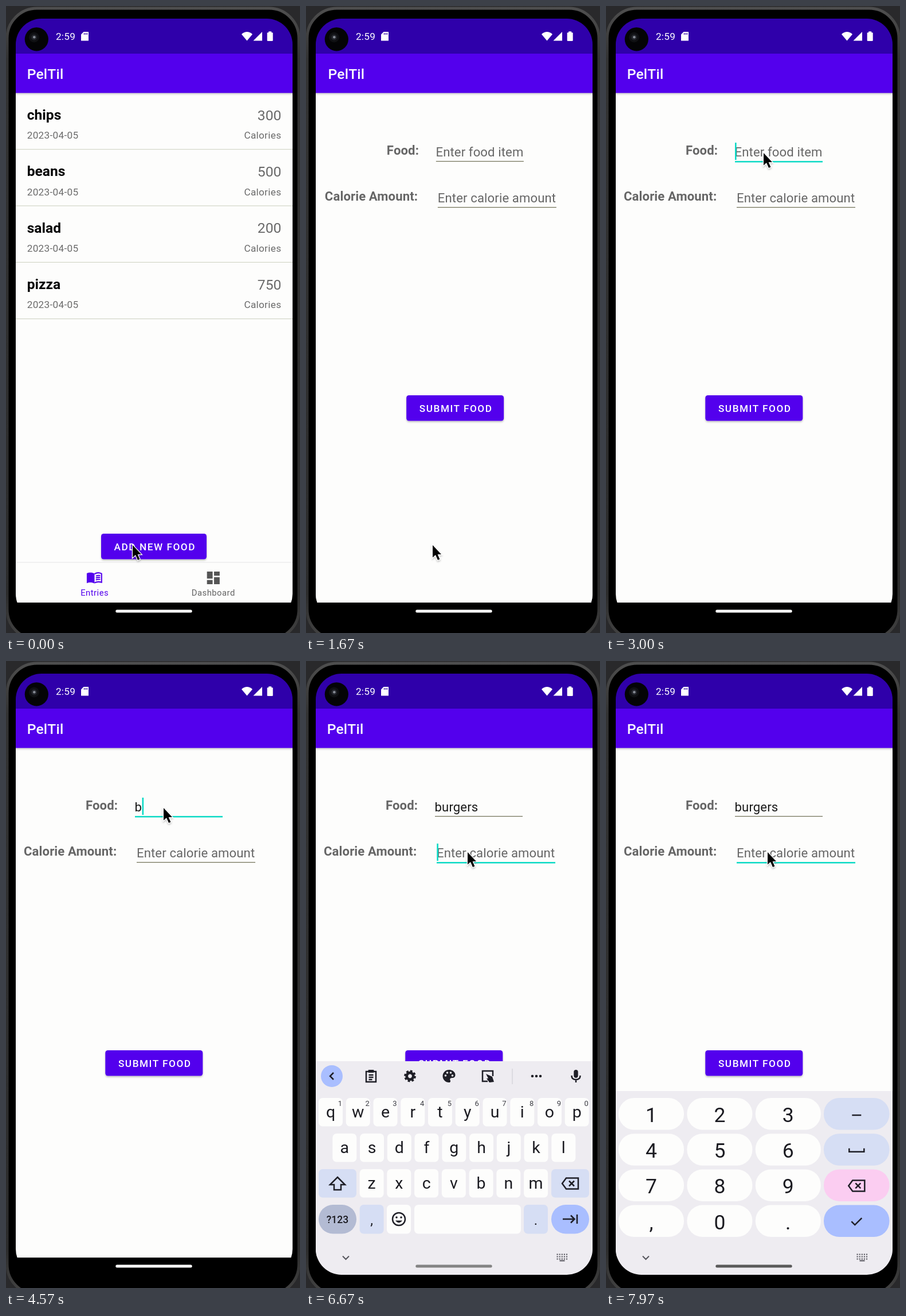
Write an HTML page that moves like this. It is 513 px wide and 1092 px high and loops after 8 s.

```html
<!DOCTYPE html>
<html lang="en">
<head>
<meta charset="utf-8">
<title>Food log</title>
<style>
html, body { margin: 0; width: 100%; height: 100%; overflow: hidden; background: #29292b; }
svg { display: block; width: 100vw; height: 100vh; }
text { font-family: Roboto, "Noto Sans", sans-serif; white-space: pre; }
.title { font-size: 24.6px; font-weight: 500; letter-spacing: .2px; fill: #fff; }
.food { font-size: 24.6px; font-weight: 700; fill: #050505; }
.amount { font-size: 24.6px; fill: #696969; text-anchor: end; }
.small { font-size: 17.2px; letter-spacing: .3px; fill: #6b6b6b; }
.end { text-anchor: end; }
.button { font-size: 17.2px; font-weight: 500; letter-spacing: 1.54px; fill: #fff; text-anchor: middle; }
.tab { font-size: 14.8px; letter-spacing: .49px; text-anchor: middle; }
.field { font-size: 22.1px; letter-spacing: .12px; fill: #666; }
.label { font-weight: 700; }
.typed { fill: #1b1b1b; }
.key { font-size: 28.5px; fill: #1b1b21; text-anchor: middle; }
.hint { font-size: 13px; fill: #3c3c44; text-anchor: middle; }
.digit { font-size: 35.5px; fill: #1b1b21; text-anchor: middle; }
.line { fill: none; stroke: #1f1f27; stroke-width: 2.5; }
</style>
</head>
<body>
<svg viewBox="0 0 513 1092" preserveAspectRatio="none">
  <defs>
    <clipPath id="screen"><rect x="17" y="22" width="483" height="1047" rx="45"/></clipPath>
    <clipPath id="window"><rect x="17" y="83" width="483" height="956"/></clipPath>
    <linearGradient id="rim" x2="0" y2="1">
      <stop offset="0" stop-color="#4e4e4e"/><stop offset=".08" stop-color="#333"/>
      <stop offset=".93" stop-color="#2c2c2c"/><stop offset="1" stop-color="#444"/>
    </linearGradient>
    <linearGradient id="fade" x2="0" y2="1">
      <stop offset="0" stop-color="#000" stop-opacity=".2"/><stop offset="1" stop-color="#000" stop-opacity="0"/>
    </linearGradient>
    <filter id="shadow" x="-30%" y="-30%" width="170%" height="180%">
      <feDropShadow dx="0" dy="2" stdDeviation="1.5" flood-opacity=".25"/>
    </filter>
  </defs>
  <rect width="513" height="1092" fill="#29292b"/>
  <rect x="2" y="4" width="509" height="1099" rx="52" fill="#000" stroke="url(#rim)" stroke-width="5"/>
  <g clip-path="url(#screen)">
    <rect x="17" y="22" width="483" height="62" fill="#2f00aa"/>
    <g clip-path="url(#window)">
      <g id="entries"></g>
      <g id="form"></g>
    </g>
    <g id="keyboard"></g>
  </g>
  <g id="status"></g>
  <rect id="pill" x="191.3" y="1051.6" width="133.4" height="5" rx="2.5"/>
  <g id="pointer">
    <path d="M1 2V23.5L6 19L10 28L13.4 26.5L9.6 18H16Z" fill="#000" stroke="#fff" stroke-width="2.4" paint-order="stroke" filter="url(#shadow)"/>
  </g>
</svg>
<script>
const LOOP = 8000;
const PURPLE = '#5300ed', TEAL = '#0bdac5', INK = '#1f1f27';
const WHITE = '#fdfdfc', PALE = '#d6def4', BLUE = '#a9beff', BOARD = '#eeecf1';
const byId = id => document.getElementById(id);

const rect = (x, y, w, h, fill, r = 0, extra = '') =>
  `<rect x="${x}" y="${y}" width="${w}" height="${h}" rx="${r}" fill="${fill}" ${extra}/>`;
const text = (x, y, value, cls, extra = '') => `<text x="${x}" y="${y}" class="${cls}" ${extra}>${value}</text>`;
const path = (d, extra = 'class="line"') => `<path d="${d}" ${extra}/>`;
const circle = (x, y, r, extra) => `<circle cx="${x}" cy="${y}" r="${r}" ${extra}/>`;
const at = (x, y, body, scale = 1) => `<g transform="translate(${x} ${y}) scale(${scale})">${body}</g>`;
const fill = color => `fill="${color}"`;

// Page edges extend sideways so that a sliding page leaves no gap.
const appPage = () =>
  rect(-40, 83, 600, 956, WHITE) + rect(-40, 151, 600, 5, 'url(#fade)') +
  rect(-40, 83, 600, 68.5, PURPLE) + text(36.7, 127, 'PelTil', 'title');
const button = (x, y, w, label) =>
  rect(x, y, w, 44.5, PURPLE, 4.5, 'filter="url(#shadow)"') + text(259.8, y + 29, label, 'button');

function buildEntries() {
  const foods = [['chips', 300], ['beans', 500], ['salad', 200], ['pizza', 750]];
  const rows = foods.map(([name, calories], i) => at(0, i * 98.4,
    text(36.7, 198, name, 'food') + text(480.3, 198.5, calories, 'amount') +
    text(36.7, 231.3, '2023-04-05', 'small') + text(480.3, 231.3, 'Calories', 'small end') +
    rect(17, 249, 483, 1.2, '#d3d6c8'))).join('');
  const book = path('M1 5.5C4 4 9 4 12 6V20C9 18.2 4 18.2 1 19.5Z', fill(PURPLE)) +
    path('M12 6.5C15 4.5 19 4.5 22 6V18.3C19 17.4 15 17.4 12 19M14 9.5Q17 8.2 20 8.8M14 12.2Q17 10.9 20 11.5M14 14.9Q17 13.6 20 14.2',
      `fill="none" stroke="${PURPLE}" stroke-width="1.7"`);
  const tiles = path('M3 13h8V3H3zM3 21h8v-6H3zM13 21h8V11h-8zM13 3v6h8V3z', fill('#555'));
  byId('entries').innerHTML = appPage() + rows + button(166, 919, 184, 'ADD NEW FOOD') +
    rect(17, 968.5, 483, 1, '#e5e5e8') + at(139.7, 981.2, book, 1.23) + at(347, 981.2, tiles, 1.23) +
    text(154.7, 1027, 'Entries', 'tab', fill(PURPLE)) + text(361.8, 1027, 'Dashboard', 'tab', fill('#646464'));
}

function buildForm() {
  byId('form').innerHTML = appPage() +
    text(139, 259, 'Food:', 'field label') + text(31, 338.5, 'Calorie Amount:', 'field label') +
    text(224.6, 261.5, '', 'field', 'id="food"') + text(228, 341.5, 'Enter calorie amount', 'field') +
    '<rect id="foodLine" x="225" width="153"/><rect id="calorieLine" x="228" width="207"/>' +
    rect(225, 263.6, 0, 1.4, '#1b1b1b', 0, 'id="composing"') +
    rect(0, 0, 2.6, 30, TEAL, 0, 'id="caret"') + button(173.3, 678, 170, 'SUBMIT FOOD');
}

const mic = rect(-3.7, -11, 7.4, 14, INK, 3.7) + path('M-7.5 -1Q-7.5 6 0 6Q7.5 6 7.5 -1M0 6V11');
const backspace = path('M-7 -9.5H14V9.5H-7L-14 0ZM-2 -4.5L7 4.5M7 -4.5L-2 4.5');
const arrowCircle = side => circle(45, 723, 19, fill(BLUE)) + at(45, 723, path(`M${-3 * side} -6L${3 * side} 0L${-3 * side} 6`));

function toolbar() {
  const clipboard = path('M-8.5 -8H8.5V10H-8.5ZM-4 -2H4M-4 2H4M-4 6H2') + rect(-5, -11, 10, 5, INK, 1);
  const gear = circle(0, 0, 5.8, 'class="line" style="stroke-width:4.8"') +
    circle(0, 0, 8.7, 'class="line" style="stroke-width:3.4" stroke-dasharray="3.8 3.033"');
  const holes = [[-6, -1], [-3, -6], [3, -6], [6, -1]].map(([x, y]) => circle(x, y, 1.8, fill(BOARD))).join('');
  const palette = path('M0 -11A11 11 0 0 0 0 11C3 11 3 8 2 7C1 4 3 3 6 3C9 3 11 1 11 -2C11 -7 6 -11 0 -11Z', fill(INK)) + holes;
  const resize = path('M9 0V-9H-9V9H0') + path('M-3 -4L8 1L11 10L3 11L-2 4L1 4Z', fill(INK));
  const dots = [-7, 0, 7].map(x => circle(x, 0, 2.3, fill(INK))).join('');
  return arrowCircle(-1) + at(113.5, 723, clipboard) + at(181.5, 723, gear) + at(249.5, 723, palette) +
    at(317, 723, resize) + rect(359.5, 710, 1, 27, '#c9c9d2') + at(402, 723, dots);
}

function letterKeys() {
  const rows = [['qwertyuiop', 22, 761], ['asdfghjkl', 46.3, 823], ['zxcvbnm', 93.6, 885]];
  const keys = rows.map(([letters, left, y], row) => [...letters].map((letter, i) => {
    const x = left + i * 47.75;
    return rect(x, y, 42, 49.5, WHITE, 7) + text(x + 21, y + 33.5, letter, 'key') +
      (row ? '' : text(x + 37.5, y + 13.5, (i + 1) % 10, 'hint'));
  }).join('')).join('');
  const shift = path('M0 -11L13 2H6V11H-6V2H-13Z');
  const smile = circle(0, 0, 11, 'class="line"') + circle(-4, -3, 1.8, fill(INK)) + circle(4, -3, 1.8, fill(INK)) +
    path('M-6 2.5Q0 10 6 2.5Z', fill(INK));
  const next = path('M-13 0H7M1 -6.5L7.5 0L1 6.5M12 -8V8');
  return keys + rect(22, 885, 66, 49.5, PALE, 7) + at(55, 910, shift) +
    rect(428, 885, 66, 49.5, PALE, 7) + at(461, 910, backspace) +
    rect(22, 947, 66, 50.5, '#b3bbd3', 25) + text(55, 979, '?123', 'key', 'style="font-size:17.5px;font-weight:500"') +
    rect(93.6, 947, 42, 50.5, PALE, 7) + text(114.6, 982, ',', 'key', 'style="font-size:24px"') +
    rect(141, 947, 42, 50.5, WHITE, 7) + at(162, 972, smile) + rect(189, 947, 186, 50.5, WHITE, 7) +
    rect(380, 947, 42, 50.5, PALE, 7) + text(401, 982, '.', 'key', 'style="font-size:24px"') +
    rect(428, 947, 66, 50.5, BLUE, 25) + at(461, 972, next);
}

function numberKeys() {
  const sideColors = [PALE, PALE, '#fbcdf1', BLUE];
  const icons = ['M-8 1.5H8', 'M-13 -3V3H13V-3', '', 'M-9 0L-3 6L9 -6'];
  return ['123', '456', '789', ',0.'].map((digits, row) => {
    const y = 761 + row * 62.2;
    return [...digits].map((digit, i) => rect(22 + i * 119.4, y, 114, 55.5, WHITE, 27) +
        text(79 + i * 119.4, y + 42, digit, 'digit')).join('') +
      rect(380, y, 114.5, 55.5, sideColors[row], 27) +
      at(437.3, y + 28.5, row === 2 ? backspace : path(icons[row]));
  }).join('');
}

function buildKeyboard() {
  const dots = [0, 1, 2].map(r => path(`M-9 ${r * 4 - 5}H10`, 'stroke="#55555c" stroke-width="2.2" stroke-dasharray="2.2 1.9"')).join('');
  byId('keyboard').innerHTML =
    rect(17, 697, 483, 400, BOARD, 0, 'id="board"') +
    `<g id="letters"><g id="tools">${toolbar()}</g>` +
    `<g id="collapsed">${arrowCircle(1)}${rect(436.5, 699, 1, 48, '#cfcfd8')}</g>` +
    `${at(471, 723, mic)}${letterKeys()}</g><g id="numbers">${numberKeys()}</g>` +
    at(69.5, 1039.5, path('M-5.5 -3L0 2.5L5.5 -3', 'fill="none" stroke="#55555c" stroke-width="2"')) +
    at(446.5, 1038.5, dots + path('M-4 6H5', 'stroke="#55555c" stroke-width="2"'));
}

function buildStatus() {
  byId('status').innerHTML = circle(53.3, 57.8, 20.6, fill('#040406')) + circle(49, 54.5, 9, fill('#0f1013')) +
    circle(49, 54.5, 5, fill('#23252b')) + circle(49.3, 54.2, 2.3, fill('#858a94')) +
    text(86.9, 59.3, '2:59', 'small', 'style="fill:#fff"') +
    path('M135.5 45H144V60.5H131V49.5Z', fill('#fff')) +
    path('M136.5 47V50M139 47V50M141.5 47V50', 'stroke="#2f00aa" stroke-width="1.2"') +
    path('M420.5 60.5L411 49.2Q420.5 41 430 49.2Z', fill('#fff')) + path('M447 45V60.5H431.5Z', fill('#fff')) +
    rect(455.7, 46.3, 10, 14.7, '#fff', 1.2) + rect(458.2, 44.3, 5, 3, '#fff');
}

const clamp = v => Math.max(0, Math.min(1, v));
const progress = (t, from, to) => clamp((t - from) / (to - from));
const smooth = p => p * p * (3 - 2 * p);
const easeOut = p => 1 - (1 - p) ** 3;
const pageEase = p => p < 1 / 6 ? .4 * (6 * p) ** 3 : 1 - .6 * (1 - (p - 1 / 6) * 1.2) ** 4;
const show = (id, on) => byId(id).style.display = on ? '' : 'none';
const set = (id, values) => Object.entries(values).forEach(([name, value]) => byId(id).setAttribute(name, value));

const OPEN = 1410, FOCUS_FOOD = 2750, FOCUS_CALORIES = 6400, KEYBOARD_IN = 4740, NUMBERS = 6800;
const WORD = 'burgers', KEY_TIMES = [4400, 5150, 5450, 5720, 5860, 6000, 6150];
const MOVES = [[1950, 2650, 220, 937, 274, 254], [5300, 5700, 274, 254, 281, 331]];

const drawField = (id, y, focused) =>
  set(id, { y, height: focused ? 2.5 : 1.3, fill: focused ? TEAL : '#77775f' });

function draw(t) {
  const slide = pageEase(progress(t, OPEN, OPEN + 450));
  set('entries', { transform: `translate(${-48.3 * slide} 0)` });
  set('form', { transform: `translate(${48.3 * (1 - slide)} 0)`, opacity: progress(t, OPEN + 50, OPEN + 133) });
  show('entries', t < OPEN + 450);

  const typed = KEY_TIMES.filter(time => time <= t).length;
  const onCalories = t >= FOCUS_CALORIES;
  const onFood = t >= FOCUS_FOOD && !onCalories;
  const food = byId('food');
  food.textContent = typed ? WORD.slice(0, typed) : 'Enter food item';
  food.setAttribute('class', typed ? 'field typed' : 'field');
  const width = typed ? food.getComputedTextLength() : 0;
  drawField('foodLine', 269.9, onFood);
  drawField('calorieLine', 350, onCalories);

  const composing = onFood && typed > 1;
  set('composing', { width: composing ? width : 0 });
  const lastInput = onCalories ? FOCUS_CALORIES : typed ? KEY_TIMES[typed - 1] : FOCUS_FOOD;
  show('caret', (onFood || onCalories) && (t - lastInput) % 1000 < 500);
  set('caret', onCalories ? { x: 228.3, y: 318 } : { x: 225 + width, y: 238 });

  const numeric = t >= NUMBERS;
  show('keyboard', t >= KEYBOARD_IN);
  set('keyboard', { transform: `translate(0 ${372 * (1 - easeOut(progress(t, KEYBOARD_IN, KEYBOARD_IN + 290)))})` });
  set('board', { y: numeric ? 749 : 697 });
  show('letters', !numeric);
  show('numbers', numeric);
  show('tools', !composing);
  show('collapsed', composing);

  const shade = Math.round(253 - 163 * progress(t, 6500, 6730));
  set('pill', { fill: `rgb(${shade},${shade},${shade})` });

  const [from, to, x0, y0, x1, y1] = t < 4000 ? MOVES[0] : MOVES[1];
  const p = smooth(progress(t, from, to));
  set('pointer', { transform: `translate(${x0 + (x1 - x0) * p} ${y0 + (y1 - y0) * p})` });
}

buildEntries();
buildForm();
buildKeyboard();
buildStatus();

const start = performance.now();
function tick() {
  draw((performance.now() - start) % LOOP);
  requestAnimationFrame(tick);
}
tick();
</script>
</body>
</html>
```
